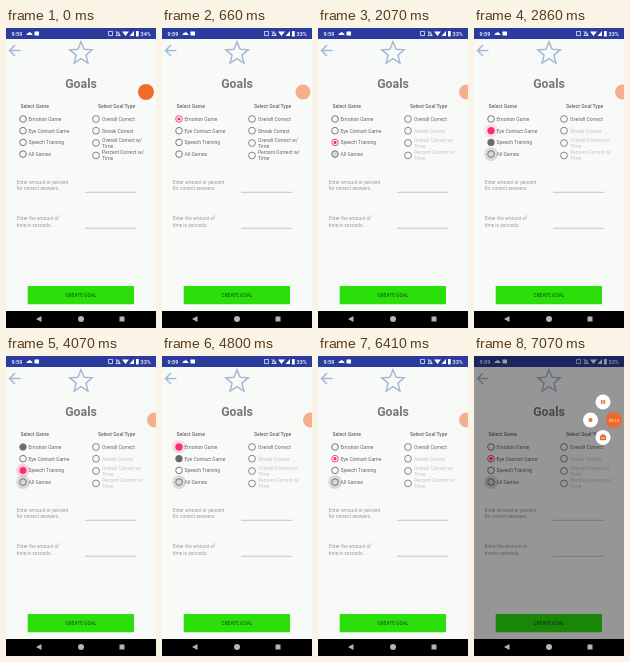
Animation of 150x300 px, one loop 7.34 s. Source, as an HTML page:

```html
<!DOCTYPE html>
<html lang="en">
<head>
<meta charset="utf-8">
<title>Goals</title>
<style>
  html, body { margin: 0; width: 100%; height: 100%; overflow: hidden; background: #f8faf7; }
  svg { display: block; width: 100vw; height: 100vh; }
  text { font-family: Roboto, "Open Sans", sans-serif; font-size: 5px; fill: #666; }
  .hint { font-size: 4.8px; fill: #999; }
  .status text { font-size: 5.5px; font-weight: 500; fill: #fff; }
  .line { fill: none; stroke: #a3b9d6; stroke-width: 1.5; }
</style>
</head>
<body>
<svg viewBox="0 0 150 300" preserveAspectRatio="none">
  <rect width="150" height="300" fill="#f8faf7"/>
  <g class="status">
    <rect width="150" height="11" fill="#2c3c9e"/>
    <text x="5.500" y="7.500">9:59</text>
    <g fill="#fff">
      <path d="M20.500 7q0-2 2-2q1-2 2.500 0q1.500 .3 1.500 2z"/>
      <rect x="28.500" y="3.500" width="4.500" height="4"/>
      <path d="M116 3.500h7l-3.500 4.500zM123.500 8h4.500v-5zM130 3h2.700v5.500h-2.700z"/>
    </g>
    <path d="M102.500 7.500v-4h4v4zM110 7.500q1-1 1-3q1-1.500 2 0q0 2 1 3zM109.500 3l5 5" fill="none" stroke="#fff" stroke-width=".7"/>
    <text id="battery" x="134.500" y="7.500"></text>
  </g>
  <path class="line" d="M14.500 22.500H3.500M9 17L3.500 22.500l5.500 5.500"/>
  <path class="line" id="star"/>
  <text x="75" y="60.300" text-anchor="middle" style="font-size:12.300px;font-weight:700;fill:#777">Goals</text>
  <text x="14.500" y="79.700" font-weight="500">Select Game</text>
  <text x="92" y="79.700" font-weight="500">Select Goal Type</text>
  <g id="games"></g>
  <g id="types"></g>
  <text class="hint" x="10.700" y="155.700">Enter amount or percent</text>
  <text class="hint" x="10.700" y="162">for correct answers.</text>
  <text class="hint" x="10.700" y="192.300">Enter the amount of</text>
  <text class="hint" x="10.700" y="198.700">time in seconds.</text>
  <path d="M79 164.300h51.500M79 200.300h51.500" stroke="#b0b0b0" stroke-width=".7"/>
  <rect x="21.700" y="258" width="106.300" height="18.200" rx=".5" fill="#2bdf0b"/>
  <text x="75" y="268.800" text-anchor="middle" style="font-size:4.800px;font-weight:500;fill:#17651a">CREATE GOAL</text>
  <rect y="283" width="150" height="17" fill="#000"/>
  <g fill="#b5b5b5">
    <path d="M30 291l5.500-3v6z"/>
    <circle cx="75" cy="291" r="3"/>
    <rect x="113.500" y="288.500" width="5" height="5"/>
  </g>
  <rect id="shade" width="150" height="283" fill="#000"/>
  <g id="menu"></g>
  <circle id="bubble" fill="#f26a2a"/>
  <text id="timer" x="140" y="65.500" text-anchor="middle" style="font-size:4px;fill:#fff">00:10</text>
</svg>
<script>
const LOOP = 7340;
const PINK = "#f92f70", DARK = "#6a6a6a", LIGHT = "#c4c4c4";
const $ = id => document.getElementById(id);
const clamp = v => Math.max(0, Math.min(1, v));
const ramp = (t, from, to) => clamp((t - from) / (to - from));
const ease = p => p * p * (3 - 2 * p);
const mix = (a, b, p) => a + (b - a) * p;

function add(parent, tag, attrs, text = "") {
  const el = document.createElementNS("http://www.w3.org/2000/svg", tag);
  set(el, attrs);
  el.textContent = text;
  parent.append(el);
  return el;
}
function set(el, attrs) {
  for (const key in attrs) el.setAttribute(key, attrs[key]);
}

const starPoints = Array.from({ length: 10 }, (_, i) => {
  const r = i % 2 ? 5.2 : 11.8, a = i * Math.PI / 5;
  return `${75 + r * Math.sin(a)} ${25.5 - r * Math.cos(a)}`;
});
$("star").setAttribute("d", `M${starPoints.join("L")}Z`);

const games = ["Emotion Game", "Eye Contact Game", "Speech Training", "All Games"].map((label, i) => {
  const y = 91 + i * 11.7, parent = $("games");
  const ripple = add(parent, "circle", { cx: 17, cy: y, r: 0 });
  const ring = add(parent, "circle", { cx: 17, cy: y, r: 3.3, fill: "none", "stroke-width": .9 });
  const dot = add(parent, "circle", { cx: 17, cy: y });
  add(parent, "text", { x: 22.5, y: y + 1.8 }, label);
  return { ripple, ring, dot };
});

const types = [
  [91, "Overall Correct"], [102.7, "Streak Correct"],
  [115, "Overall Correct w/", "Time"], [127.5, "Percent Correct w/", "Time"]
].map(([y, ...lines]) => {
  const group = add($("types"), "g", {});
  add(group, "circle", { cx: 90, cy: y, r: 3.4, fill: "none", stroke: DARK, "stroke-width": .8 });
  return lines.map((line, i) =>
    add(group, "text", { x: 96, y: y + 1.8 + (i - (lines.length - 1) / 2) * 6 }, line));
});

const controls = [
  [129, 46, "M-1.300-2v4M1.300-2v4"],
  [116.5, 64, "M-1-1h2v2h-2z"],
  [129, 81.5, "M-2.300-1h4.600v3h-4.600zM-1-1v-1.200h2v1.200M0 0v1"]
].map(([x, y, icon]) => {
  const el = add($("menu"), "g", {});
  add(el, "circle", { r: 7.5, fill: "#fff" });
  add(el, "path", { d: icon, fill: "none", stroke: "#ee642c", "stroke-width": 1.5 });
  return { el, x, y };
});

// Each tap: time and the game row it selects.
const taps = [
  [330, 0], [930, 1], [1390, 2], [2700, 1], [3350, 0], [3990, 2],
  [4360, 1], [4660, 0], [4900, 2], [5600, 1], [5860, 2], [6110, 1]
];
const SWITCH = 300;

// The dot swells to fill the ring, then shrinks to its resting size.
const dotRadius = (p, from, to) =>
  p < .6 ? mix(from, 3.2, ramp(p, 0, .3)) : mix(3.2, to, ramp(p, .6, 1));

function drawRadio(row, t) {
  const { ripple, ring, dot } = games[row];
  const index = taps.findLastIndex(([time]) => time <= t);
  const tap = taps[index];
  const selected = !!tap && tap[1] === row;
  const leaving = index > 0 && taps[index - 1][1] === row;
  const p = tap ? clamp((t - tap[0]) / SWITCH) : 1;
  const color = selected ? PINK : DARK;
  const size = selected ? dotRadius(p, 0, 1.6) : leaving ? dotRadius(p, 1.6, 0) : 0;
  set(ring, { stroke: color });
  set(dot, { r: size, fill: color });

  // The last row keeps its ripple; the others fade out.
  const press = row === 3 ? 2100
    : taps.find(([time, r]) => r === row && t >= time - 100 && t < time + 260)?.[0];
  const fade = row === 3 ? 1 : 1 - ramp(t, press + 120, press + 260);
  set(ripple, press
    ? { r: 6.8 * ramp(t, press - 100, press + 50), opacity: .18 * fade, fill: row === 3 ? "#444" : color }
    : { r: 0 });
}

function draw(t) {
  games.forEach((_, row) => drawRadio(row, t));
  types.forEach((labels, i) => labels.forEach(label =>
    label.style.fill = i && t >= 2070 ? LIGHT : "#666"));
  $("battery").textContent = t < 70 ? "34%" : "33%";

  // The bubble fades, then slides partly off the edge.
  const fade = ease(ramp(t, 70, 700)), slide = ease(ramp(t, 1530, 1860));
  const open = t < 6940 ? 0 : t < 7000 ? .35 : t < 7070 ? .7 : 1;
  set($("bubble"), {
    cx: mix(mix(mix(140, 141, fade), 148.5, slide), 140, open), cy: 64,
    r: mix(mix(8, 7.5, fade), 8, open),
    opacity: mix(mix(1, .52, fade), 1, open)
  });
  set($("shade"), { opacity: .4 * open });
  set($("timer"), { opacity: open === 1 ? 1 : 0 });
  controls.forEach(({ el, x, y }) => set(el, {
    transform: `translate(${mix(140, x, open)} ${mix(64, y, open)}) scale(${open})`,
    opacity: open
  }));
}

const start = performance.now();
function frame() {
  draw((performance.now() - start) % LOOP);
  requestAnimationFrame(frame);
}
frame();
</script>
</body>
</html>
```
